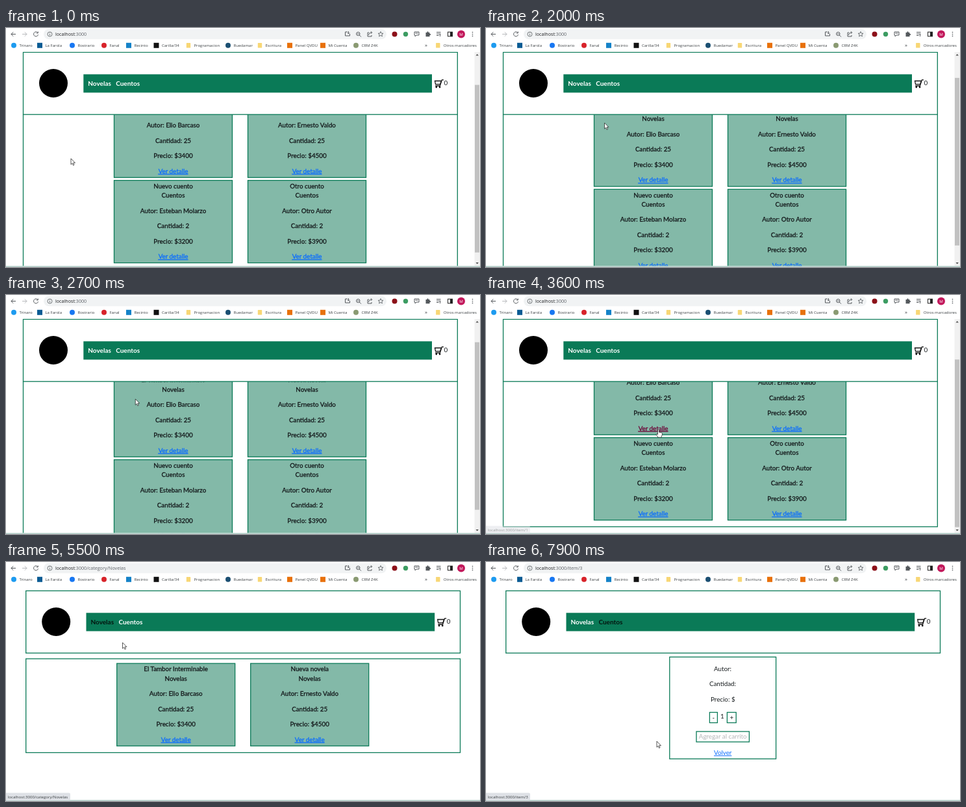
Write an HTML page that moves like this. It is 730 px wide and 368 px high and loops after 8000 ms.

```html
<!DOCTYPE html>
<html lang="es">
<head>
<meta charset="utf-8">
<title>Librería</title>
<style>
html, body { margin: 0; width: 100%; height: 100%; overflow: hidden; background: #fff; }
svg { display: block; width: 730px; height: 368px; }
.shop { font: 9.8px Lato, sans-serif; fill: #14191b; }
.shop .mid { text-anchor: middle; }
.card text { stroke: #14191b; stroke-width: .3px; }
.shop .link { fill: #0d6efd; text-decoration: underline; }
.card .link { stroke: #0d6efd; stroke-width: .35px; }
.shop .link.hover { fill: #6d0b3b; stroke: #6d0b3b; }
.box { fill: none; stroke: #0a7a57; stroke-width: 1.3px; }
.card .box { fill: #83b9a8; }
.nav { font-weight: 700; font-size: 10px; fill: #fff; }
.nav.dark { fill: #04150f; }
.ui { font: 6.1px "Open Sans", "Noto Sans", sans-serif; fill: #3c4043; }
.icon { fill: none; stroke: #54585c; stroke-width: 1px; }
</style>
</head>
<body>
<svg id="stage" viewBox="0 0 730 368"></svg>
<script>
const text = (x, y, s, cls = '', extra = '') => `<text x="${x}" y="${y}" class="${cls}" ${extra}>${s}</text>`;
const rect = (x, y, w, h, extra) => `<rect x="${x}" y="${y}" width="${w}" height="${h}" ${extra}/>`;
const dot = (x, y, r, fill) => `<circle cx="${x}" cy="${y}" r="${r}" fill="${fill}"/>`;
const path = (d, extra = 'class="icon"') => `<path d="${d}" ${extra}/>`;
const box = (x, y, w, h) => rect(x, y, w, h, 'class="box"');

const books = [
  ['El Tambor Interminable', 'Novelas', 'Elio Barcaso', 25, 3400],
  ['Nueva novela', 'Novelas', 'Ernesto Valdo', 25, 4500],
  ['Nuevo cuento', 'Cuentos', 'Esteban Molarzo', 2, 3200],
  ['Otro cuento', 'Cuentos', 'Otro Autor', 2, 3900]
];

function card([title, kind, author, stock, price], i) {
  const x = i % 2 ? 372.5 : 166.5, y = i > 1 ? 287.6 : 156.2, mid = x + 91;
  const lines = [title, kind, 'Autor: ' + author, 'Cantidad: ' + stock, 'Precio: $' + price, 'Ver detalle'];
  const tops = [12.2, 26.4, 50, 73.5, 97, 120.5];
  return `<g class="card">${box(x, y, 182, 127)}` +
    lines.map((s, n) => text(mid, y + tops[n], s, n == 5 ? 'mid link' : 'mid')).join('') + '</g>';
}

const list = (id, items, height) =>
  `<g id="${id}">${box(26.5, 149, 668.8, height)}${items.map(card).join('')}</g>`;

const detail = `<g id="item">${box(278.6, 146.3, 163.8, 156.8)}
  ${text(360.3, 167.6, 'Autor:', 'mid')}${text(360.3, 191.2, 'Cantidad:', 'mid')}${text(360.6, 214.8, 'Precio: $', 'mid')}
  ${box(340.2, 231.5, 12, 16)}${text(346.2, 243.2, '-', 'mid')}${text(359.7, 241.1, '1', 'mid')}
  ${box(367.2, 231.5, 13.8, 16)}${text(374.1, 243.2, '+', 'mid')}
  ${box(319.8, 261, 81.4, 16)}${text(360.5, 272, 'Agregar al carrito', 'mid', 'fill="#b4b6b8"')}
  ${text(360.5, 296.8, 'Volver', 'mid link')}</g>`;

const header = `<g id="header">${rect(25, 36, 671, 104, 'fill="#fff"')}${box(26.5, 44.4, 668.8, 95.8)}
  ${dot(73, 92, 22, '#000')}${rect(119.3, 78.3, 536.7, 28.2, 'fill="#0a7a57"')}
  ${text(126.3, 95.9, 'Novelas', 'nav', 'id="novelasLink"')}${text(169.2, 95.9, 'Cuentos', 'nav', 'id="cuentosLink"')}
  ${path('M660.5 88.5h10l-2 5.2h-7zM674 86.8h-2.6l-3 9.2h-7.2', 'fill="none" stroke="#111" stroke-width="1.3"')}
  ${dot(662.8, 98, 1.4, '#111')}${dot(668, 98, 1.4, '#111')}${text(674.6, 95.3, '0')}</g>`;

const bookmarks = [
  [12, '#1d9bf0', 'c', 'Trinaro'], [52, '#0b5c94', 's', 'La Farola'], [102, '#1877f2', 'c', 'Rostrario'],
  [151, '#d8232a', 'c', 'Fanal'], [189, '#1482c8', 's', 'Recinto'], [231.5, '#111', 's', 'Carilla/34'],
  [281, '#f8d775', 'f', 'Programacion'], [342, '#1b4f72', 'c', 'Ruedamar'], [391, '#f8d775', 'f', 'Escritura'],
  [437, '#e8710a', 's', 'Panel QVDU'], [488, '#e8710a', 's', 'Mi Cuenta'], [539, '#8a9a72', 'c', 'CRM Z4K'],
  [665.3, '#f8d775', 'f', 'Otros marcadores']
];
const marks = { c: x => [x - 4, 22.8, 8, 8, 4], s: x => [x - 4, 22.8, 8, 8, 0], f: x => [x - 3.2, 23, 6.4, 7.6, .7] };
const bookmark = ([x, color, kind, label]) => {
  const [l, t, w, h, r] = marks[kind](x);
  return rect(l, t, w, h, `rx="${r}" fill="${color}"`) + text(x + 8.4, 28.8, label, 'ui');
};

const toolbar = rect(0, 0, 730, 37, 'fill="#fff"') + rect(58, 1.8, 528, 15.4, 'rx="7.7" fill="#f1f3f4"') +
  path('M15 9.5H8m3.2-3.3L8 9.5l3.2 3.3') +
  path('M25 9.5h7m-3.2-3.3 3.2 3.3-3.2 3.3', 'class="icon" style="stroke:#b8babd"') +
  path('M48.8 7.2a3.5 3.5 0 1 0 .7 3M49.3 5.5v2.4h-2.4') +
  path('M71 9.5a3.5 3.5 0 1 1-7 0a3.5 3.5 0 1 1 7 0M67.5 9v2.5M67.5 7.2v.9', 'class="icon" style="stroke-width:.8"') +
  path('M526 6h-3.5v6h7V9M527.5 5v4m-1.6-1.6 1.6 1.6 1.6-1.6') +
  path('M545 9a2.7 2.7 0 1 1-5.4 0a2.7 2.7 0 1 1 5.4 0M544.3 11l2.6 2.6M541 9h2.6') +
  path('M559 7h-2v6h6v-2M558.5 11c.3-3 2-4 5-4m-1.6-1.8 1.8 1.8-1.8 1.8') +
  path('M577 5.5l1.1 2.6 2.9.2-2.2 1.8.7 2.8-2.5-1.5-2.5 1.5.7-2.8-2.2-1.8 2.9-.2z', 'class="icon" style="stroke-width:.8"') +
  dot(598.5, 9.5, 4, '#8c1019') + dot(615.5, 9.5, 3.7, '#3c9c62') +
  path('M629 6h7v5h-4l-2 2v-2h-1zM630.5 8h4') +
  path('M646.5 7h2V5.6h2V7h2v2h1.4v2h-1.4v2.2h-6z', 'fill="#54585c"') +
  path('M663 6.5h6.5M663 9h6.5M663 11.5h3.5M668.5 9v4') +
  rect(680.5, 6.2, 7, 6.6, 'class="icon" style="stroke:#222"') + rect(684, 6, 3.8, 7, 'fill="#222"') +
  dot(701, 9.5, 6, '#c2185b') + text(701, 11.9, 'M', 'ui', 'text-anchor="middle" style="fill:#fff"') +
  [6.6, 9.5, 12.4].map(y => dot(718.5, y, .8, '#54585c')).join('') +
  text(645, 29, '»', 'ui', 'style="font-size:8px"') + bookmarks.map(bookmark).join('') +
  '<text x="76" y="12.2" class="ui" style="font-size:7.15px;fill:#202124">localhost<tspan id="url" fill="#5f6368"></tspan></text>';

const scrollbar = `<g id="scrollbar">${rect(721.5, 37, 8.5, 329.5, 'fill="#f1f1f1"')}
  ${path('M723.5 42.6l2.2-2.6 2.2 2.6zM723.5 361l2.2 2.6 2.2-2.6z', 'fill="#505050"')}
  ${rect(722, 46, 7, 258, 'id="thumb" fill="#c1c1c1"')}</g>`;

const outline = 'fill="#fff" stroke="#222" stroke-width=".75" stroke-linejoin="round"';
const cursors = path('M0 0v9.2l2.1-1.9 1.4 3.2 1.5-.7-1.4-3.1h2.9z', `id="arrow" ${outline}`) +
  path('M-1 1q1-1.5 2 0v3.4l4 .9q1.2.4 1 1.8l-.7 3-.8 2.4H-.5L-3.2 8.5q-.3-1.8 1-1.2L-1 8.2z', `id="hand" ${outline}`);

stage.innerHTML = `<clipPath id="view"><rect x="0" y="36.5" width="730" height="330"/></clipPath>
  ${toolbar}
  <g clip-path="url(#view)"><g id="page" class="shop">
    <g id="lists">${list('home', books, 275.8)}${list('Novelas', books.slice(0, 2), 144.5)}${list('Cuentos', books.slice(2), 144.5)}</g>
    ${detail}${header}</g>${scrollbar}</g>
  ${rect(0, 366.4, 730, 1.6, 'fill="#b5d0ca"')}
  <g id="status">${rect(-2, 355.4, 50, 11.8, 'id="bubble" rx="2" fill="#dee1e6"')}${text(2.8, 363.5, '', 'ui', 'id="hint"')}</g>
  <g id="cursor">${cursors}</g>`;

const $ = id => document.getElementById(id);
const show = (id, on) => $(id).style.display = on ? '' : 'none';

// Cursor tip: time, x, y
const moves = [[0, 100, 201], [900, 168, 150], [1300, 71, 91], [1600, 71, 91], [2000, 182.5, 146],
  [2500, 182.5, 146], [3200, 267, 217], [3400, 265.5, 206.8], [3700, 265.5, 206.8], [4100, 144, 84], [5000, 144, 86],
  [5500, 179.5, 124], [5800, 199.5, 91], [6800, 199.5, 91], [7600, 259.5, 276], [7700, 263, 276], [8000, 263, 276]];
const scrolls = [[0, 53], [1900, 53], [2200, 0], [2500, 0], [2900, 68], [8000, 68]];
const pages = [[0, 'home', ''], [4300, 'Novelas', '/category/Novelas'], [5900, 'Cuentos', '/category/Cuentos'], [7900, 'item', '/item/3']];
const hints = [[0, null], [1300, ''], [1900, null], [3400, '/item/1'], [4100, '/category/Novelas'],
  [5800, '/category/Cuentos'], [7500, '/item/3']];
const hands = [[0, 0], [1200, 1], [1700, 0], [3400, 1], [3800, 0], [4100, 1], [5200, 0], [5800, 1], [6900, 0], [7500, 1], [7900, 0]];
const bubbleWidth = { '': 47, '/item/1': 68, '/item/3': 68, '/category/Novelas': 99, '/category/Cuentos': 100 };

const current = (table, t) => table.findLast(row => row[0] <= t);
function tween(table, t) {
  const i = table.findLastIndex(row => row[0] <= t), a = table[i], b = table[i + 1] || a;
  const p = b === a ? 0 : (t - a[0]) / (b[0] - a[0]), e = p * p * (3 - 2 * p);
  return a.slice(1).map((v, n) => v + (b[n + 1] - v) * e);
}

function draw(t) {
  const [, name, url] = current(pages, t), home = name === 'home';
  const scroll = home ? tween(scrolls, t)[0] : 0;
  for (const [, id] of pages) show(id, id === name);
  $('url').textContent = ':3000' + url;
  $('page').setAttribute('transform', `translate(${home ? 0 : 4.2} 0)`);
  $('lists').setAttribute('transform', `translate(0 ${-scroll})`);
  $('header').setAttribute('transform', `translate(0 ${-Math.min(scroll, 7)})`);
  show('scrollbar', home);
  $('thumb').setAttribute('y', 46 + scroll * .785);

  $('novelasLink').classList.toggle('dark', name === 'Novelas' || t >= 4100 && t < 4300);
  $('cuentosLink').classList.toggle('dark', t >= 5800);
  $('home').querySelector('.link').classList.toggle('hover', t >= 3400 && t < 3800);
  $('Cuentos').querySelector('.link').classList.toggle('hover', t >= 7500);

  const hint = current(hints, t)[1];
  show('status', hint !== null);
  if (hint !== null) {
    $('hint').textContent = 'localhost:3000' + hint;
    $('bubble').setAttribute('width', bubbleWidth[hint] + 2);
  }
  $('status').style.opacity = t >= 3400 && t < 3700 ? .5 : 1;

  const hand = current(hands, t)[1];
  show('hand', hand);
  show('arrow', !hand);
  $('cursor').setAttribute('transform', `translate(${tween(moves, t)})`);
}

const start = performance.now();
function tick() {
  const t = (performance.now() - start) % 8000;
  draw(Math.floor(t / 100) * 100);
  requestAnimationFrame(tick);
}
tick();
</script>
</body>
</html>
```
